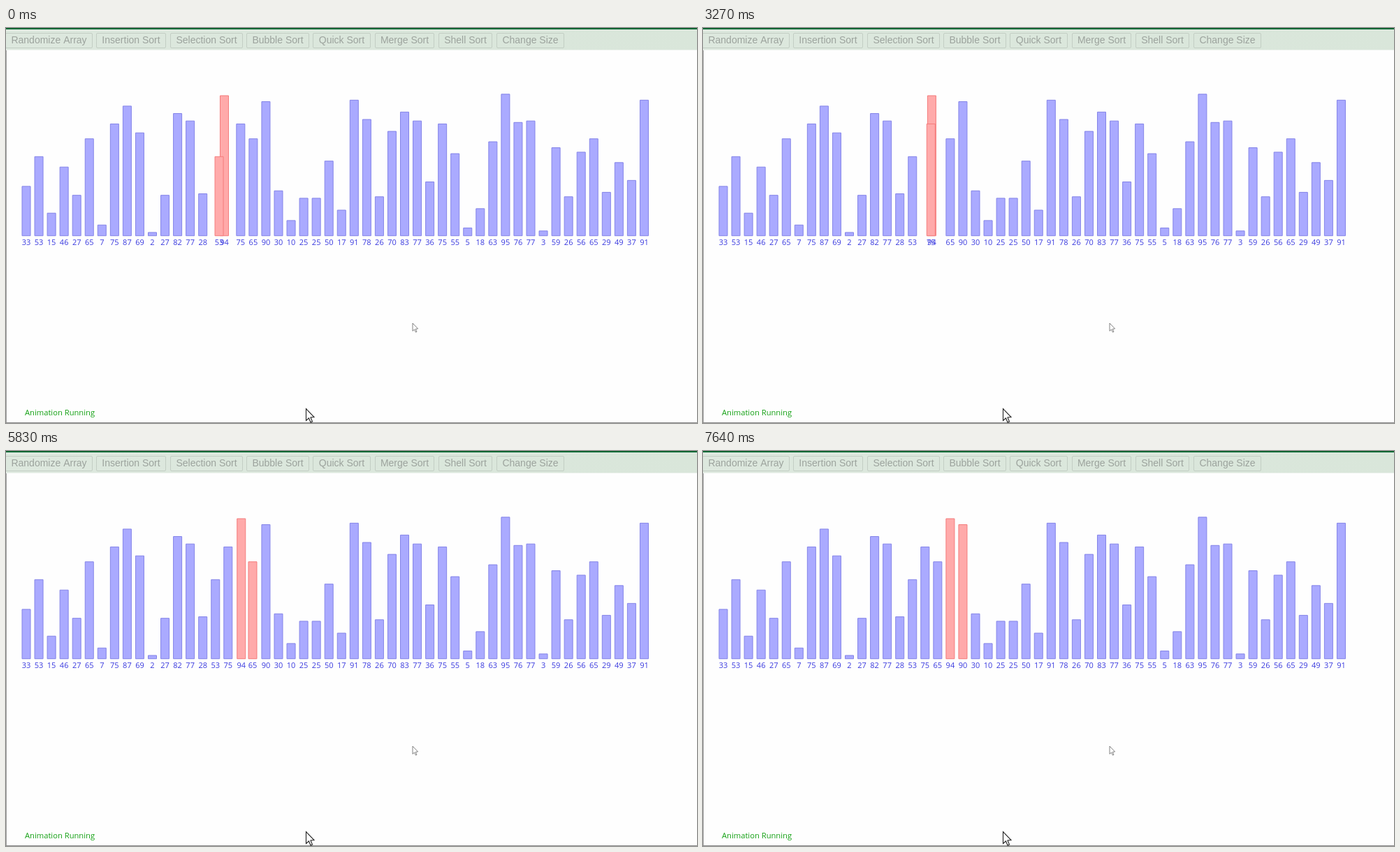
These frames come from a looping animation (989x566 px, 8000 ms). An HTML page with a canvas:

```html
<!DOCTYPE html>
<html lang="en">
<head>
<meta charset="utf-8">
<title>Bubble sort</title>
<style>
  html, body { margin: 0; width: 100%; height: 100%; overflow: hidden; background: #fefefe; }
  canvas { display: block; }
</style>
</head>
<body>
<canvas id="stage" width="989" height="566"></canvas>
<script>
const ctx = document.getElementById('stage').getContext('2d');
const LOOP = 8000;
const FLOOR = 298;
const PROGRESS_PER_TICK = 0.0775;

const initial = [
  33, 53, 15, 46, 27, 65, 7, 75, 87, 69, 2, 27, 82, 77, 28, 94, 53, 75, 65, 90,
  30, 10, 25, 25, 50, 17, 91, 78, 26, 70, 83, 77, 36, 75, 55, 5, 18, 63, 95, 76,
  77, 3, 59, 26, 56, 65, 29, 49, 37, 91
];

// Each pair is highlighted until `until`; it starts to trade places at `moveAt`.
const swaps = [
  { slot: 15, moveAt: 0, tick: 140, offset: 0.706, until: 700 },
  { slot: 16, moveAt: 2550, tick: 1700 / 12, offset: 0.143, until: 4250 },
  { slot: 17, moveAt: 5830, tick: 1810 / 13, offset: 0.05, until: 7640 },
  { slot: 18, moveAt: Infinity, until: Infinity }
];

// label, left edge, right edge
const buttons = [
  ['Randomize Array', -1, 124], ['Insertion Sort', 129, 229],
  ['Selection Sort', 235, 339], ['Bubble Sort', 344, 434],
  ['Quick Sort', 439, 522], ['Merge Sort', 528, 613],
  ['Shell Sort', 619, 696], ['Change Size', 702, 799]
];

const blue = { fill: '#aaaaff', stroke: '#8484e8' };
const red = { fill: '#ffaaaa', stroke: '#f47c7c' };

function fillRect(color, x, y, w, h) {
  ctx.fillStyle = color;
  ctx.fillRect(x, y, w, h);
}

function text(label, x, y, font, color, align = 'center') {
  ctx.font = font;
  ctx.fillStyle = color;
  ctx.textAlign = align;
  ctx.fillText(label, x, y);
}

function drawToolbar() {
  const shade = ctx.createLinearGradient(0, 0, 989, 0);
  shade.addColorStop(0, '#dde8de');
  shade.addColorStop(1, '#d9e6da');
  fillRect(shade, 0, 0, 989, 31.5);
  fillRect('#006633', 0, 0, 989, 2);
  ctx.lineWidth = 1;
  for (const [label, left, right] of buttons) {
    ctx.strokeStyle = '#c3cec4';
    ctx.beginPath();
    ctx.roundRect(left + 0.5, 7.5, right - left - 1, 21, 1.5);
    ctx.stroke();
    const center = left < 0 ? 61.5 : (left + right) / 2;
    text(label, center, 22, '14px "Liberation Sans", Arial, sans-serif', '#9ca39d');
  }
}

function drawPointer(x, y, scale, color) {
  ctx.save();
  ctx.translate(x, y);
  ctx.scale(scale, scale);
  ctx.beginPath();
  for (const [px, py] of [[0, 0], [0, 17], [4, 13.5], [6.5, 19.5], [9, 18.5], [6.5, 12.5], [11.5, 12]]) {
    ctx.lineTo(px, py);
  }
  ctx.closePath();
  ctx.fillStyle = '#fff';
  ctx.fill();
  ctx.strokeStyle = color;
  ctx.lineWidth = 1.1;
  ctx.stroke();
  ctx.restore();
}

const slotX = slot => 29 + 18.05 * slot;

function drawBar(value, x, { fill, stroke }) {
  const height = 0.5 + 2.13 * value;
  ctx.fillStyle = fill;
  ctx.strokeStyle = stroke;
  ctx.lineWidth = 1;
  ctx.beginPath();
  ctx.rect(x - 6, FLOOR - height - 0.3, 12, height);
  ctx.fill();
  ctx.stroke();
}

function drawLabel(value, x) {
  text(value, x, 311, '11px "Open Sans", "Noto Sans", sans-serif', '#3a3adf');
}

function drawArray(time) {
  const values = [...initial];
  const current = swaps.findIndex(swap => time < swap.until);
  for (const { slot } of swaps.slice(0, current)) {
    [values[slot], values[slot + 1]] = [values[slot + 1], values[slot]];
  }

  const { slot, moveAt, tick, offset } = swaps[current];
  const ticks = Math.floor((time - moveAt + 1) / tick);
  const progress = time < moveAt ? 0 : Math.min(1, offset + ticks * PROGRESS_PER_TICK);

  const bars = values.map((value, i) => {
    const shift = i === slot ? progress : i === slot + 1 ? -progress : 0;
    const colors = i === slot || i === slot + 1 ? red : blue;
    return { value, x: slotX(i + shift), colors };
  });
  for (const { value, x, colors } of bars) drawBar(value, x, colors);
  for (const { value, x } of bars) drawLabel(value, x);
}

function draw(now) {
  fillRect('#fefefe', 0, 0, 989, 566);
  drawToolbar();
  drawArray(now % LOOP);
  text('Animation Running', 27, 555, '11.2px "Open Sans", "Noto Sans", sans-serif', '#12a012', 'left');
  fillRect('#a0a0a0', 0, 32, 1, 534);
  fillRect('#8c8c8c', 0, 565, 989, 1);
  drawPointer(582, 423, 0.66, '#555');
  drawPointer(429.5, 545.5, 1, '#222');
}

const start = performance.now();
function loop() {
  draw(performance.now() - start);
  requestAnimationFrame(loop);
}
loop();
</script>
</body>
</html>
```
